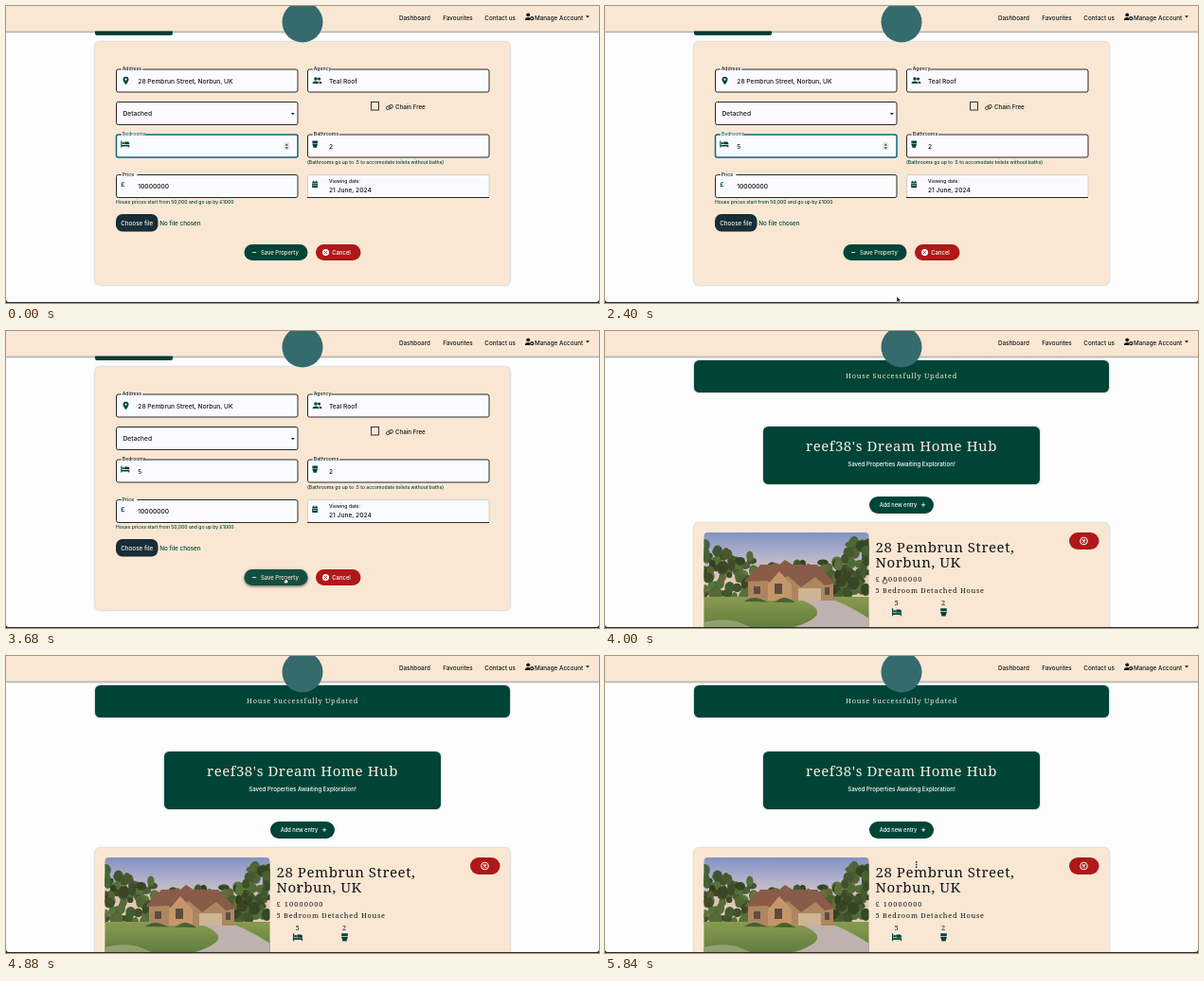
Write an HTML page that moves like this. It is 626 by 314 pixels and loops after 5920 ms.

```html
<!DOCTYPE html>
<html lang="en">
<head>
<meta charset="utf-8">
<title>Property form</title>
<style>
  html, body { margin: 0; width: 100%; height: 100%; overflow: hidden; background: #2b2b2b; }
  svg { display: block; width: 626px; height: 314px; font-family: Inter, sans-serif; }
  text { fill: #121517; font-size: 6.65px; font-weight: 500; white-space: pre; }
  .nav text { font-size: 6.3px; }
  .label { font-size: 5.1px; }
  .hint { font-size: 5.05px; fill: #004438; }
  .serif { font-family: "Noto Serif", serif; letter-spacing: .75px; font-size: 7.4px; }
  .serif.big { font-size: 15px; letter-spacing: .55px; }
  .mid { text-anchor: middle; }
  .btn { font-size: 5.9px; }
  .cream { fill: #f9e7d3; }
  .green { fill: #004438; }
  .red { fill: #b01818; }
  .box { fill: #fbfbfe; stroke: #25292c; stroke-width: 1; }
  .shade { filter: drop-shadow(0 .7px .9px #0005); }
  .focus .box { stroke: #0d6580; stroke-width: 1.5; }
  .focus .label { fill: #0d6580; }
  #spin { display: none; }
  .focus #spin { display: inline; }
  .hover { fill: #124f40; filter: drop-shadow(0 1px 1.5px #0009); }
</style>
</head>
<body>
<svg viewBox="0 0 626 314">
  <defs>
    <linearGradient id="sky" x2="0" y2="1">
      <stop offset="0" stop-color="#8292c2"/>
      <stop offset=".25" stop-color="#b5b3cc"/>
      <stop offset=".5" stop-color="#e3c9b4"/>
    </linearGradient>
    <linearGradient id="lawn" x2="0" y2="1">
      <stop offset="0" stop-color="#8a9a50"/>
      <stop offset="1" stop-color="#56783a"/>
    </linearGradient>
    <linearGradient id="fade" x2="0" y2="1">
      <stop offset="0" stop-color="#0007"/>
      <stop offset="1" stop-color="#0000"/>
    </linearGradient>
    <clipPath id="window"><path d="M0 0H626V310Q626 313 623 313H3Q0 313 0 310Z"/></clipPath>
    <clipPath id="frame"><rect x="104.5" y="213" width="174" height="110" rx="4"/></clipPath>
    <g id="bed" class="green">
      <path d="M-5-4h1.2v5H5v3H3.9V2.7h-7.7V4H-5Z"/>
      <path d="M-.7-2.7H3Q5-2.7 5-.8V.4H-.7Z"/>
      <circle cx="-2.3" cy="-1" r="1.3"/>
    </g>
    <path id="toilet" class="green" d="M-3.300-4h6.600v3h-6.600ZM-3.300-.4h6.600Q3.300 1.600 2.300 2.400V4.300h-4.600V2.400Q-3.300 1.600-3.300-.4Z"/>
    <g id="cross" fill="none" stroke="#fff">
      <circle r="3.7" stroke-width="1.1"/>
      <path d="M-1.500-1.500 1.500 1.500M1.500-1.500-1.500 1.500" stroke-width="1.200"/>
    </g>
  </defs>

  <g clip-path="url(#window)">
    <rect width="626" height="314" fill="#fdfdfd"/>

    <g id="form">
      <rect class="green" x="94" y="20" width="82" height="11" rx="2"/>
      <rect class="cream shade" x="94" y="38" width="438" height="257" rx="5"/>
      <g id="fields"></g>

      <path class="green" d="M126.500 83.300Q123.500 79.500 123.500 77.700A3 3 0 0 1 129.500 77.700Q129.500 79.500 126.500 83.300Z"/>
      <circle cx="126.5" cy="77.7" r="1.1" fill="#fff"/>
      <g class="green">
        <circle cx="327" cy="77" r="1.8"/><circle cx="330.6" cy="77" r="1.6"/>
        <path d="M323.700 82V81Q324 79.500 327 79.500T330.300 81V82ZM330.900 82V81Q330.900 80.200 330.300 79.600Q333.400 79.700 333.400 81V82Z"/>
      </g>
      <path d="M300.800 113h4l-2 2.200Z" fill="#222"/>
      <rect x="385.5" y="101.5" width="8" height="8.5" fill="none" stroke="#333"/>
      <g fill="none" stroke="#444" stroke-width=".9" transform="rotate(-25 405 107)">
        <rect x="401.3" y="105.3" width="4.5" height="3.4" rx="1.7"/>
        <rect x="404" y="105.3" width="4.5" height="3.4" rx="1.7"/>
      </g>
      <text x="411" y="109.3" style="font-size:6.2px">Chain Free</text>
      <use href="#toilet" transform="translate(326.200 146) scale(.85)"/>
      <text class="hint" x="318" y="166.5">(Bathrooms go up to .5 to accomodate toilets without baths)</text>
      <text class="hint" x="116" y="209">House prices start from 50,000 and go up by £1000</text>
      <text x="121.3" y="191.3" style="font-weight:600;fill:#004438">£</text>
      <path class="green" d="M323.200 185.800h1v-1h1v1h1.800v-1h1v1h1v6.200h-5.800Z"/>
      <path d="M323.200 187.400h5.800M324 189.500h4.200" stroke="#fff" stroke-width=".6"/>

      <rect x="116" y="220" width="44.5" height="18.5" rx="7" fill="#172d37"/>
      <text class="mid" x="138.2" y="231.7" style="font-size:6.3px;fill:#fbf0e4">Choose file</text>
      <text x="162.3" y="231.7" style="font-size:6.3px;fill:#004438">No file chosen</text>

      <rect id="save" class="green" x="251.5" y="252" width="67" height="17" rx="8.5"/>
      <path d="M260 260.500h4.200" stroke="#f9e7d3" stroke-width=".9"/>
      <text class="btn" x="269" y="262.6" style="fill:#f9e7d3">Save Property</text>
      <rect class="red" x="327" y="252" width="47.5" height="17" rx="8.5"/>
      <circle cx="337.5" cy="260.5" r="3.5" fill="#fff"/>
      <path d="M336.200 259.200l2.600 2.600m0-2.600l-2.600 2.600" stroke="#b01818"/>
      <text class="btn" x="344.3" y="262.6" style="fill:#fff">Cancel</text>
    </g>

    <g id="hub">
      <rect class="green shade" x="94" y="31" width="438" height="34" rx="5.5"/>
      <text class="serif mid" x="313" y="50" style="fill:#f9e7d3">House Successfully Updated</text>
      <rect class="green shade" x="167" y="101" width="292" height="61" rx="5.5"/>
      <text class="serif big mid" x="313" y="127" style="fill:#fbeee0">reef38's Dream Home Hub</text>
      <text class="mid" x="313" y="142.8" style="font-size:6.15px;fill:#fff">Saved Properties Awaiting Exploration!</text>
      <rect class="green" x="279" y="175" width="68" height="18" rx="9"/>
      <text class="btn" x="289.7" y="186" style="font-size:5.7px;fill:#fff">Add new entry</text>
      <path d="M334 183.800h4.200m-2.100-2.100v4.200" stroke="#fff" stroke-width=".8"/>

      <rect class="cream shade" x="94" y="203" width="438" height="130" rx="5"/>
      <g clip-path="url(#frame)">
        <rect x="104" y="213" width="175" height="102" fill="url(#sky)"/>
        <g id="trees"></g>
        <rect x="104" y="281" width="175" height="40" fill="url(#lawn)"/>
        <path d="M206 284H240Q258 290 279 304V314H196Q230 304 223 294Q218 288 206 284Z" fill="#bdb2ad"/>
        <path d="M104 308Q123 303 139 307L156 314H104Z" fill="#94a070"/>
        <path d="M151 262L168 253H226L241 266V285H151Z" fill="#ad8660"/>
        <path d="M147 265L164 247H184L190 242L198 247H224L243 267L232 269L222 260L207 271L193 259L178 268L171 264Z" fill="#8a5b49"/>
        <path d="M172 268L184 254L197 268V285H172Z" fill="#c5966a"/>
        <path d="M204 272h24v13h-24Z" fill="#cdb493"/>
        <path d="M157 270h7v8h-7ZM179 267h8v11h-8ZM232 271h5v8h-5Z" fill="#5e4c41"/>
        <path d="M147 286Q156 279 166 284T183 284T201 287Z" fill="#47602f"/>
      </g>

      <text class="serif big" x="285.5" y="234">28 Pembrun Street,</text>
      <text class="serif big" x="285.5" y="250">Norbun, UK</text>
      <text class="serif" x="285.5" y="264.5" style="letter-spacing:1.1px">£ 10000000</text>
      <text class="serif" x="285.5" y="277">5 Bedroom Detached House</text>
      <text class="serif mid" x="308" y="290">5</text>
      <text class="serif mid" x="357.5" y="290">2</text>
      <use href="#bed" x="308" y="297.3"/>
      <use href="#toilet" x="357.5" y="297.3"/>
      <text class="serif" x="288" y="317.5">Area</text>
      <rect class="red" x="490" y="213" width="31.5" height="18" rx="9"/>
      <use href="#cross" x="505.5" y="222"/>
    </g>

    <g class="nav">
      <rect y="26.5" width="626" height="2.5" fill="url(#fade)"/>
      <rect class="cream" width="626" height="26.5"/>
      <circle cx="313" cy="17" r="21.5" fill="#356b6d"/>
      <text x="415" y="14.7">Dashboard</text>
      <text x="461.3" y="14.7">Favourites</text>
      <text x="505.3" y="14.7">Contact us</text>
      <g fill="#121517">
        <circle cx="551.2" cy="9.3" r="1.9"/>
        <path d="M548 15V13.600Q548.400 12 551 12L553 12.600V15Z"/>
        <circle cx="555.2" cy="13.2" r="1.5" fill="none" stroke="#121517" stroke-width="1.2"/>
        <path d="M612 10.300h4l-2 2.200Z"/>
      </g>
      <text x="558" y="14.7">Manage Account</text>
    </g>
  </g>

  <g id="cursor" stroke-linejoin="round">
    <path data-kind="arrow" d="M0 0V6.200L1.500 5L2.500 7.200L3.500 6.700L2.500 4.600H4.400Z" fill="#111" stroke="#fff" stroke-width=".5"/>
    <path data-kind="hand" d="M-.6 0Q0-.7.6 0V2.200L2.800 2.900V4.800L2 6.400H-.8L-2.300 3.700L-1.700 3.200L-.6 4Z" fill="#fff" stroke="#111" stroke-width=".7"/>
    <path data-kind="beam" d="M0-3.500V3.500" fill="none" stroke="#222" stroke-width="1.500" stroke-dasharray="1.400"/>
  </g>
</svg>

<script>
  const LOOP = 5920, STEP = 80;
  const SAVED = 4000, HOVER = 3200, BLUR = 3520, LEAVE = 4640;
  const $ = id => document.getElementById(id);

  // x, y, label, value, value x, extra markup
  const fields = [
    [116.5, 67, 'Address', '28 Pembrun Street, Norbun, UK', 139.3],
    [318.5, 67, 'Agency', 'Teal Roof', 341],
    [116.5, 101.5, '', 'Detached', 123.5],
    [116.5, 136, 'Bedrooms', '', 139.3, `<use href="#bed" transform="translate(125.8 146) scale(.9)"/>
      <g id="spin"><rect x="293" y="144" width="6.5" height="8.5" rx="2" fill="#e6e6e6"/>
      <path d="M294.6 147.4l1.7-2 1.7 2ZM294.6 149.2l1.7 2 1.7-2Z" fill="#444"/></g>`],
    [318.5, 136, 'Bathrooms', '2', 341],
    [116.5, 178.5, 'Price', '10000000', 139.3],
  ];

  function field([x, y, label, value, vx, extra = '']) {
    const lx = x + 6.3, w = label.length * 2.9 + 2;
    const tag = label && `<rect x="${lx - 1}" y="${y - 1}" width="${w}" height="2" fill="#fbfbfe"/>
      <text class="label" x="${lx}" y="${y + 1.2}">${label}</text>`;
    return `<g id="${label}"><rect class="box" x="${x}" y="${y}" width="191.5" height="24" rx="2"/>
      ${tag}<text class="value" x="${vx}" y="${y + 14.5}">${value}</text>${extra}</g>`;
  }

  $('fields').innerHTML = fields.map(field).join('') +
    `<rect x="318.5" y="178.5" width="191.5" height="24" rx="2" fill="#fbfbfe" stroke="#bbb" stroke-width=".6"/>
     <path d="M318 202.5H510" stroke="#25292c"/>
     <text class="label" x="341" y="186.5">Viewing date:</text>
     <text x="341" y="197">21 June, 2024</text>`;

  // Loose foliage, tall at both sides and low behind the house
  let seed = 7;
  const rand = () => (seed = seed * 16807 % 2147483647) / 2147483647;
  let trees = '';
  for (let i = 0; i < 260; i++) {
    const u = rand(), depth = rand(), side = Math.abs(u - .48) * 2;
    const top = 254 - 34 * side ** 1.3 + 6 * Math.sin(u * 40);
    const x = 104 + u * 175, y = top + depth * (282 - top);
    const light = 19 + 16 * rand(), hue = 72 + 28 * rand();
    trees += `<ellipse cx="${x}" cy="${y}" rx="${3 + 3 * rand()}" ry="${3 + 4 * rand()}" fill="hsl(${hue} 32% ${light}%)"/>`;
  }
  $('trees').innerHTML = trees;

  // Pointer path: time, x, y
  const path = [
    [720, 284, 208], [960, 272, 237], [1360, 277, 250], [2000, 305, 300],
    [2400, 308, 307], [2640, 308, 307], [3280, 295, 260.5], [LEAVE, 295, 260.5], [5200, 328.7, 220.5],
  ];

  function pointAt(t) {
    const i = path.findIndex(p => p[0] > t);
    if (i < 0) return path[path.length - 1].slice(1);
    const [t0, x0, y0] = path[i - 1], [t1, x1, y1] = path[i];
    const k = (t - t0) / (t1 - t0), e = k * k * (3 - 2 * k);
    return [x0 + (x1 - x0) * e, y0 + (y1 - y0) * e];
  }

  const show = (el, on) => { el.style.display = on ? '' : 'none'; };
  const bedrooms = $('Bedrooms'), count = bedrooms.querySelector('.value');
  const cursors = [...$('cursor').children];

  function draw(t) {
    show($('form'), t < SAVED);
    show($('hub'), t >= SAVED);
    count.textContent = t < 480 ? '' : t < 1680 ? '3' : '5';
    bedrooms.classList.toggle('focus', t < BLUR);
    $('save').classList.toggle('hover', t >= HOVER);

    const visible = t >= path[0][0];
    show($('cursor'), visible);
    if (!visible) return;
    const kind = t < HOVER ? 'arrow' : t <= LEAVE ? 'hand' : 'beam';
    cursors.forEach(c => show(c, c.dataset.kind === kind));
    $('cursor').setAttribute('transform', `translate(${pointAt(t)})`);
  }

  function tick() {
    draw(Math.floor(performance.now() % LOOP / STEP) * STEP);
    requestAnimationFrame(tick);
  }
  tick();
</script>
</body>
</html>
```
